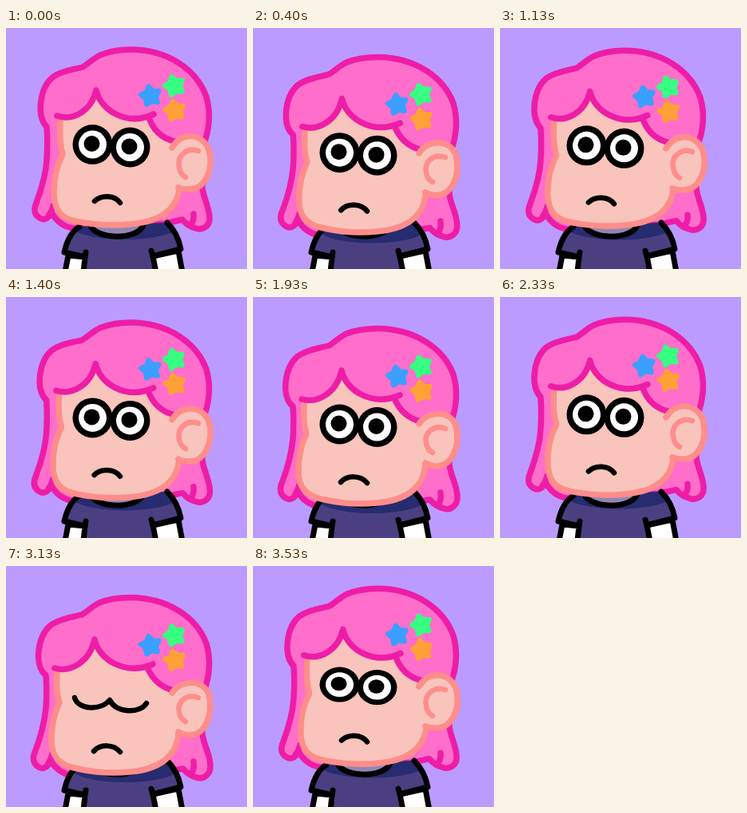
Write an HTML page with a canvas that moves like this. It is 302 by 302 pixels and loops after 3.59 s.

```html
<!DOCTYPE html>
<html lang="en">
<head>
<meta charset="utf-8">
<title>Sad bob</title>
<style>
html, body { margin: 0; width: 100%; height: 100%; overflow: hidden; background: #bb9bff; }
canvas { display: block; width: 100vw; height: 100vh; }
</style>
</head>
<body>
<canvas id="stage"></canvas>
<script>
const SIZE = 302, LOOP = 3590, BEAT = 1200;
const canvas = document.getElementById('stage');
const ctx = canvas.getContext('2d');
const PINK = '#ff6ecb', MAGENTA = '#ee1da7', SKIN = '#f8c4bb', SALMON = '#ff8d8b', BLACK = '#000';

// [start within a beat, how far the head has sunk]
const BOB = [[0, 0], [200, .4], [400, .75], [530, .95], [730, 1], [930, .7], [1060, .35], [1130, .1]];
// [start within the loop, how open the eyes are]
const LIDS = [[0, 1], [2600, .94], [2800, .5], [2930, 0], [3330, .3], [3460, .75], [3530, .88]];

// Each shape has a raised and a lowered pose with the same structure.
const SHAPES = {
  hair: [
    'M51 124C38 110 42 76 58 62C70 53 86 52 96 49C103 45 108 39 118 34C130 29 142 27 156 27C204 27 239 53 251 86C258 110 254 130 247 148L246 200C248 215 255 225 255 238C256 248 246 254 238 251C230 249 224 244 221 240L200 245L84 251C72 249 63 242 57 231C54 238 48 242 42 238C34 233 35 226 38 219C44 203 50 185 51 165C52 150 52 137 51 124Z',
    'M50 137C35 125 39 90 55 75C67 66 84 64 95 61C102 57 107 51 117 46C130 41 142 39.5 156 39.5C204 40 239 65 251 97C258 120 254 141 248 158L246 210C248 226 256 236 256 250C257 261 247 268 239 265C231 263 225 258 222 254L200 257L84 263C72 261 62 254 56 244C53 251 47 256 41 252C33 247 33 239 37 231C43 215 48 197 50 178C51 163 51 150 50 137Z'],
  locks: [
    'M54 234C57 231 58 227 59 223M235 233C236 241 233 245 230 247',
    'M53 247C56 243 57 239 58 235M235 245C236 253 235 258 231 261'],
  face: [
    'M68 110C84 117 107 104 113 78C118 102 150 124 179 112C184 127 195 138 211 142L217 203C213 230 190 243 155 246C135 248 115 247 92 243C72 240 60 232 60 205C60 188 64 172 71 158C68 148 67 130 68 110Z',
    'M64 128C81 134 105 120 111 92C116 117 149 138 177 127C183 141 194 152 210 156L216 210C214 240 190 255 155 258C135 260 112 259 90 254C68 250 56 240 57 216C57 200 60 186 67 171C64 163 63 148 64 128Z'],
  jaw: [
    'M68 116C67 130 68 148 71 158C64 172 60 188 60 205C60 232 72 240 92 243C115 247 135 248 155 246C190 243 213 230 217 203',
    'M64 134C63 148 64 163 67 171C60 186 57 200 57 216C56 240 68 250 90 254C112 259 135 260 155 258C190 255 214 240 216 210'],
  fringe: [
    'M64 110C84 117 107 104 113 78C118 102 150 124 185 108M179 112C184 127 195 138 211 142',
    'M61 128C81 134 105 120 111 92C116 117 149 138 184 123M177 127C183 141 194 152 210 156'],
  ear: [
    'M208 150C219 131 244 130 254 152C262 180 247 202 231 202C225 202 220 202 216 200',
    'M208 159C218 144 244 140 254 160C261 190 247 212 231 212C225 212 221 211 216 208'],
  earFold: [
    'M241 154C227 149 214 160 217 174C218 181 221 185 225 187',
    'M241 165C227 159 214 170 217 183C218 190 221 193 225 195'],
  mouth: [
    'M111 217C119 209 136 209 143 219',
    'M110 232C118 223 135 223 143 233'],
  shut: [
    'M86 151C90 166 118 168 130 154C138 171 168 171 176 158',
    'M86 165C90 180 118 182 130 168C138 185 168 185 176 172']
};

const lerp = (a, b, u) => a + (b - a) * u;
const valueAt = (steps, t) => steps.reduce((v, [start, next]) => t >= start ? next : v, 0);

function shape(name, u) {
  const [up, down] = SHAPES[name];
  const ends = down.match(/[\d.]+/g);
  let i = 0;
  return new Path2D(up.replace(/[\d.]+/g, n => lerp(+n, +ends[i++], u).toFixed(2)));
}

function fill(path, color) {
  ctx.fillStyle = color;
  ctx.fill(path);
}

function stroke(path, color, width) {
  ctx.strokeStyle = color;
  ctx.lineWidth = width;
  ctx.stroke(path);
}

function ellipse(x, y, rx, ry, color) {
  const path = new Path2D();
  path.ellipse(x, y, rx, ry, 0, 0, Math.PI * 2);
  fill(path, color);
}

function star(x, y, turn, color) {
  const path = new Path2D();
  for (let i = 0; i < 10; i++) {
    const r = i % 2 ? 7 : 12, a = turn + i * Math.PI / 5 - Math.PI / 2;
    path.lineTo(x + r * Math.cos(a), y + r * Math.sin(a));
  }
  path.closePath();
  fill(path, color);
  stroke(path, color, 6);
}

function drawBody(u) {
  const shirt = new Path2D('M73 281C76 268 82 255 92 249L202 244C211 253 217 266 219 277L184 286L188 306L97 306L99 287Z');
  fill(shirt, '#4b3f82');
  ctx.save();
  ctx.clip(shirt);
  ellipse(149, 247 + 6 * u, 68, 18, '#272b70');
  ctx.restore();
  const neck = new Path2D('M105 246C112 266 165 266 172 247');
  fill(neck, '#8f86b4');
  stroke(neck, BLACK, 7);
  const arms = new Path2D('M78 285L74 306L97 306L99 287ZM184 286L188 306L221 306L216 279Z');
  fill(arms, '#fff');
  stroke(arms, BLACK, 7);
  stroke(new Path2D('M92 249C82 255 76 268 73 281L99 287L100 281M202 244C211 253 217 266 219 277L184 286L182 279'), BLACK, 7);
}

function drawEyes(u, open) {
  if (!open) {
    stroke(shape('shut', u), BLACK, 6.5);
    return;
  }
  const drop = (1 - open) * 10;
  const eyes = [[108.5, 146 + 13.5 * u + drop], [155.5, 149.5 + 13.5 * u + drop]];
  for (const [x, y] of eyes) ellipse(x, y, 25, 25 * open, BLACK);
  for (const [x, y] of eyes) {
    ellipse(x, y, 17.5, 17.5 * open, '#fff');
    ellipse(x - 1, y - 1, 10, 10 * open, BLACK);
  }
}

function drawHead(u, open) {
  fill(shape('face', u), SKIN);
  stroke(shape('jaw', u), SALMON, 7.5);
  stroke(shape('fringe', u), MAGENTA, 7.5);
  fill(shape('ear', u), SKIN);
  stroke(shape('ear', u), SALMON, 7.5);
  stroke(shape('earFold', u), SALMON, 6.5);
  const sink = 14.5 * u;
  star(181, 85 + sink, -.2, '#3a9fff');
  star(211, 72.5 + sink, -.3, '#36ff82');
  star(211.5, 103.5 + sink, -.2, '#ffa136');
  drawEyes(u, open);
  stroke(shape('mouth', u), BLACK, 6.5);
}

function draw(t) {
  const u = valueAt(BOB, t % BEAT);
  const scaleX = canvas.width / SIZE, scaleY = canvas.height / SIZE;
  ctx.setTransform(scaleX, 0, 0, scaleY, 0, 0);
  ctx.lineCap = ctx.lineJoin = 'round';
  ctx.fillStyle = '#bb9bff';
  ctx.fillRect(0, 0, SIZE, SIZE);
  fill(shape('hair', u), PINK);
  stroke(shape('hair', u), MAGENTA, 7.5);
  stroke(shape('locks', u), MAGENTA, 7.5);
  drawBody(u);
  drawHead(u, valueAt(LIDS, t));
}

function resize() {
  const ratio = window.devicePixelRatio || 1;
  canvas.width = Math.round(innerWidth * ratio);
  canvas.height = Math.round(innerHeight * ratio);
}

const begin = performance.now();
function tick() {
  draw((performance.now() - begin) % LOOP);
  requestAnimationFrame(tick);
}
addEventListener('resize', resize);
resize();
tick();
</script>
</body>
</html>
```
